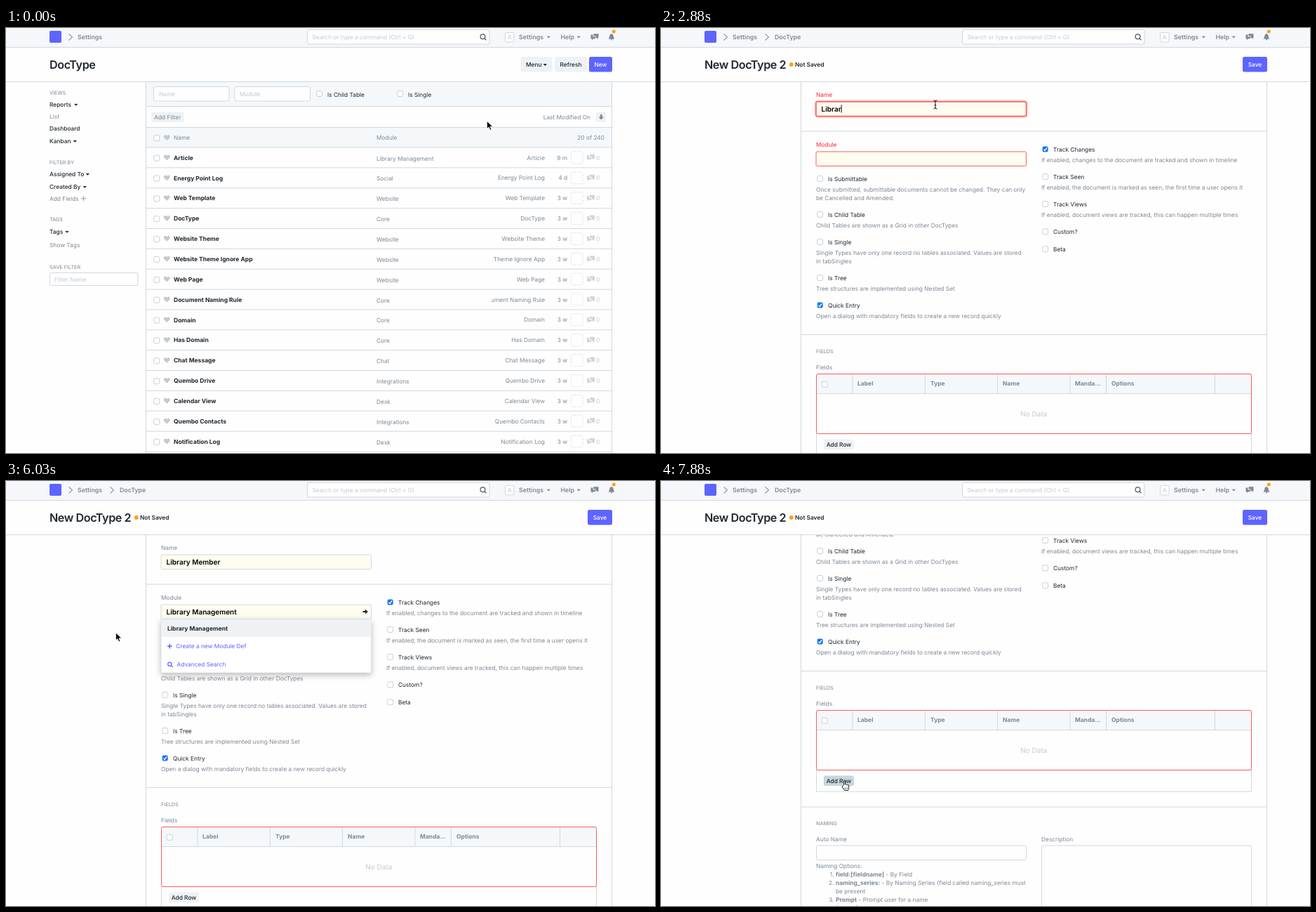
An HTML page for the animation above (8000 ms loop, 925 by 605 pixels).

```html
<!DOCTYPE html>
<html lang="en">
<head>
<meta charset="utf-8">
<title>New DocType</title>
<style>
html, body { margin: 0; width: 100%; height: 100%; overflow: hidden; background: #fefefe; }
svg { display: block; width: 925px; height: 605px; }
text { font: 400 8.35px Inter, sans-serif; fill: #1f272e; white-space: pre; text-rendering: geometricPrecision; }
.grey { fill: #7d8994; }
.pale { fill: #c3cad0; }
.blue { fill: #5e64ff; }
.white { fill: #fff; }
.med { font-weight: 500; }
.semi { font-weight: 600; }
.bold { font-weight: 700; font-size: 8.5px; }
.nav { font-weight: 600; font-size: 8.8px; fill: #7d8994; }
.cap { font-size: 7.3px; fill: #7d8994; }
.title { font-size: 16.2px; font-weight: 600; letter-spacing: -.45px; }
.value { font-size: 10px; font-weight: 600; fill: #000; }
.end { text-anchor: end; }
.mid { text-anchor: middle; }
.line { fill: none; stroke: #d1d8dd; }
.box { fill: #fefefe; stroke: #d1d8dd; }
.tint { fill: #f5f8fb; }
.btn { fill: #eef2f5; }
.field rect { fill: #fffdf0; stroke: #d1d8dd; }
.field .label { fill: #7d8994; }
.need rect { stroke: #f85f5f; }
.need .label { fill: #f8262f; }
.focus rect { filter: drop-shadow(0 0 1.5px #aab4bd); }
.need.focus rect { stroke-width: 1.5; filter: drop-shadow(0 0 1.5px #ff5858); }
.caret { stroke: #000; visibility: hidden; }
.focus .caret { visibility: visible; }
</style>
</head>
<body>
<svg id="stage" viewBox="0 0 925 605"></svg>
<script>
const text = (x, y, s, c = '') => `<text x="${x}" y="${y}" class="${c}">${s}</text>`;
const rect = (x, y, w, h, c, r = 0, more = '') =>
  `<rect x="${x}" y="${y}" width="${w}" height="${h}" rx="${r}" class="${c}" ${more}/>`;
const path = (d, more = 'class="line"') => `<path d="${d}" ${more}/>`;
const group = (id, body, more = '') => `<g id="${id}" ${more}>${body}</g>`;
const down = (x, y, color = '#1f272e') => path(`M${x - 2.7} ${y - 1.3}h5.4l-2.7 2.9z`, `fill="${color}"`);
const chevron = x => path(`M${x} 8.5l5 4.5l-5 4.5`, 'fill="none" stroke="#8d99a6" stroke-width="1.1"');
const lens = (x, y, r, color) => `<g fill="none" stroke="${color}" stroke-width="1.2">
  <circle cx="${x}" cy="${y}" r="${r}"/>${path(`M${x + r * .7} ${y + r * .7}l2.6 2.6`, '')}</g>`;
const button = (x, y, w, h, s, c = 'med', fill = 'btn') =>
  rect(x, y, w, h, fill, 2.5) + text(x + w / 2, y + h / 2 + 3, s, c + ' mid');
const check = (x, y, on) => rect(x - .3, y, 8, 8, '', 2,
  on ? 'fill="#1677f2"' : 'fill="#fff" stroke="#bcc3c9" stroke-width=".8"') +
  (on ? path(`M${x + 1.5} ${y + 4.2}l1.7 1.8l2.9-4.1`, 'fill="none" stroke="#fff" stroke-width="1.3"') : '');
const heart = (x, y) => path(`M${x} ${y + 4.2}l-4-4c-1.6-2.2 1.4-5.8 4-2.6c2.6-3.2 5.6.4 4 2.6z`, 'fill="#c3cad0"');
const chat = (x, y, color) => path(`M${x + 4} ${y}h7v5.8h-1v2l-2-2h-1v-2.6h-3z
  M${x} ${y + 1.2}h3v3h3.4v2.8h-3l-2 2v-2h-1.4z`, `fill="${color}"`);

const sidebar = () => {
  const caps = [['VIEWS', 94.5], ['FILTER BY', 193.5], ['TAGS', 275], ['SAVE FILTER', 343]];
  const items = [['Reports', 112, 99.7], ['List', 129], ['Dashboard', 146], ['Kanban', 164, 98.3],
    ['Assigned To', 211, 116.3], ['Created By', 229, 112.3], ['Add Fields', 246], ['Tags', 293, 87], ['Show Tags', 312]];
  const soft = ['List', 'Add Fields', 'Show Tags'];
  return caps.map(([s, y]) => text(62, y, s, 'cap')).join('') +
    items.map(([s, y, x]) => text(62, y, s, soft.includes(s) ? 'grey' : 'med') + (x ? down(x, y - 2.8) : '')).join('') +
    path('M107 242.8h7m-3.5-3.5v7', 'stroke="#8d99a6"') +
    rect(62.5, 348.5, 125.5, 18, 'box', 2) + text(69, 361, 'Filter Name', 'pale');
};

const listRow = ([name, module, age = '3 w'], i) => {
  const y = 184.5 + i * 28.86;
  return check(211, y - 3.3) + heart(229.3, y - .3) + text(239, y + 3.2, name, 'bold') +
    text(528, y + 4, module, 'grey') +
    `<g clip-path="url(#cut)">${text(768, y + 3, name, 'grey end')}</g>` +
    text(800, y + 3, age, 'grey end') +
    rect(805.5, y - 8.5, 16.5, 17, 'line', 2, 'stroke-dasharray="2 1.5" stroke-width=".8"') +
    chat(828, y - 4.5, '#d0d6db') + text(841, y + 3, '0', 'pale') + path(`M200 ${y + 14.4}h663`);
};

const listPage = () => sidebar() +
  rect(200, 77, 663, 34, 'tint') + rect(200, 141, 663, 29, 'tint') +
  path('M199.5 77V605M863.5 77V605M200 111.5h663M200 141.5h663M200 170h663') +
  rect(210.5, 83.5, 107.5, 20.5, 'box', 2) + text(218, 97, 'Name', 'pale') +
  rect(326, 83.5, 107.5, 20.5, 'box', 2) + text(333, 97, 'Module', 'pale') +
  check(443, 89.5) + text(458, 97.5, 'Is Child Table') + check(558, 89.5) + text(573, 97.5, 'Is Single') +
  button(207, 119.5, 46.5, 14.5, 'Add Filter', 'grey') + text(833, 130, 'Last Modified On', 'grey end') +
  rect(841, 119.5, 14.5, 14.5, 'btn', 2) + path('M847 123h2.6v3.5h2.4l-3.7 4l-3.7-4h2.4z', 'fill="#7d8994"') +
  check(211, 152.7) + heart(229.3, 156) + text(239, 159.3, 'Name', 'grey') +
  text(528, 159.3, 'Module', 'grey') + text(853, 159.3, '20 of 240', 'grey end') +
  [['Article', 'Library Management', '9 m'], ['Energy Point Log', 'Social', '4 d'], ['Web Template', 'Website'],
    ['DocType', 'Core'], ['Website Theme', 'Website'], ['Website Theme Ignore App', 'Website'], ['Web Page', 'Website'],
    ['Document Naming Rule', 'Core'], ['Domain', 'Core'], ['Has Domain', 'Core'], ['Chat Message', 'Chat'],
    ['Quembo Drive', 'Integrations'], ['Calendar View', 'Desk'], ['Quembo Contacts', 'Integrations'],
    ['Notification Log', 'Desk']].map(listRow).join('');

const field = (id, label, y) => group(id,
  text(221, y, label, 'label') + rect(221, y + 7, 299.5, 20.5, '', 2) +
  text(228.5, y + 20.8, '', 'value') + path(`M229 ${y + 11.5}v11`, 'class="caret"'), 'class="field need"');

const option = (x, y, label, lines = [], on) => check(x, y - 7.5, on) + text(x + 15, y, label) +
  lines.map((s, i) => text(x - 2, y + 14.7 + i * 12, s, 'grey')).join('');

const formPage = () =>
  path('M200 147h663M200 436.5h663M200 630h663') +
  field('name', 'Name', 98) + field('module', 'Module', 169) +
  option(223, 218, 'Is Submittable', ['Once submitted, submittable documents cannot be changed. They can only', 'be Cancelled and Amended.']) +
  option(223, 269, 'Is Child Table', ['Child Tables are shown as a Grid in other DocTypes']) +
  option(223, 308, 'Is Single', ['Single Types have only one record no tables associated. Values are stored', 'in tabSingles']) +
  option(223, 359, 'Is Tree', ['Tree structures are implemented using Nested Set']) +
  option(223, 398, 'Quick Entry', ['Open a dialog with mandatory fields to create a new record quickly'], true) +
  option(544, 176, 'Track Changes', ['If enabled, changes to the document are tracked and shown in timeline'], true) +
  option(544, 215, 'Track Seen', ['If enabled, the document is marked as seen, the first time a user opens it']) +
  option(544, 254, 'Track Views', ['If enabled, document views are tracked, this can happen multiple times']) +
  option(544, 293.3, 'Custom?') + option(544, 318.3, 'Beta') +
  text(221, 463, 'FIELDS', 'cap') + text(221, 486, 'Fields', 'grey') +
  rect(221.5, 570, 620, 38, 'line') + rect(221.5, 492.5, 620, 85, 'box', 2) + rect(222, 493, 619, 27.5, 'tint') +
  path('M222 520.5h619' + [273, 376.5, 479.5, 583, 634.5, 789.5].map(x => `M${x} 493v27.5`).join('')) +
  rect(221.5, 492.5, 620, 85, '', 2, 'fill="none" stroke="#f85f5f"') + check(229.5, 503.2) +
  [['Label', 280], ['Type', 384], ['Name', 487], ['Manda...', 590], ['Options', 642]]
    .map(([s, x]) => text(x, 509.2, s, 'grey bold')).join('') +
  `<text x="531.3" y="553" class="pale mid" style="font-size:10px">No Data</text>` +
  group('add', button(232, 585.5, 43, 14.5, 'Add Row')) +
  text(221, 655.5, 'NAMING', 'cap') + text(221, 678.5, 'Auto Name', 'grey') + rect(221.5, 685, 299, 20.5, 'box', 2) +
  text(542, 678.5, 'Description', 'grey') + rect(542.5, 685, 299, 200, 'box', 2) +
  text(221, 717.3, 'Naming Options:', 'grey') +
  [['1.', 'field:[fieldname]', ' - By Field'], ['2.', 'naming_series:', ' - By Naming Series (field called naming_series must'],
    ['', '', 'be present'], ['3.', 'Prompt', ' - Prompt user for a name'],
    ['4.', '[series]', ' - Series by prefix (separated by a dot); for']]
    .map(([n, key, s], i) => text(246.5, 729.4 + i * 12, n, 'grey end') +
      text(249, 729.4 + i * 12, `<tspan class="bold">${key}</tspan>${s}`, 'grey')).join('') +
  group('go', path('M508.5 184.9h3.4v-2.3l4 3.4l-4 3.4v-2.3h-3.4z', 'fill="#1f272e"')) +
  group('menu', rect(221, 196.5, 299.5, 76.5, '', 2,
      'fill="#fff" stroke="#d5dbe0" stroke-width=".6" style="filter:drop-shadow(0 3px 4px #0004)"') +
    rect(221.3, 197, 299, 25, 'btn') + text(230, 213, 'Library Management', 'bold') +
    path('M230 235.2h6.6m-3.3-3.3v6.6', 'stroke="#5e64ff" stroke-width="1.5"') +
    text(242.3, 238.2, 'Create a new Module Def', 'blue') +
    lens(233.3, 260.7, 2.6, '#5e64ff') + text(243.5, 264, 'Advanced Search', 'blue'));

const navbar = () => rect(0, 0, 925, 27, '', 0, 'fill="#f5f7fa"') + path('M0 27.5h925') +
  rect(62, 4, 17, 17, 'blue', 2) + chevron(89.5) + text(102, 16.2, 'Settings', 'nav') +
  rect(429.5, 2.5, 259.5, 20.5, 'box', 2.5) + text(436.5, 16, 'Search or type a command (Ctrl + G)', 'pale') +
  lens(679.5, 12.3, 3.4, '#4a545e') + rect(711.5, 6.5, 12.5, 13.5, 'box', 2) + text(717.8, 16.3, 'A', 'pale mid') +
  text(731, 16, 'Settings', 'nav') + down(773.3, 13, '#7d8994') +
  text(790.5, 16, 'Help', 'nav') + down(816.3, 13, '#7d8994') + chat(833.5, 8.3, '#7d8994') +
  path('M859 15.3c2-1.8 1-6.8 4-6.8s2 5 4 6.8zM862 16h2.4q-1.2 2.4-2.4 0z', 'fill="#7d8994" stroke="#7d8994" stroke-width=".6"') +
  '<circle cx="866.3" cy="5" r="2.5" fill="#ffa00a"/>';

const hand = 'M2.7 5.5V1.3q1-1.6 2 0V5q1-.8 1.7.3q1.2-.7 1.7.5q1.6-.5 1.6 1.4v2q0 3-1.2 4.2H3.8L.6 9Q-.5 7.4 1 7.2z';
stage.innerHTML = '<clipPath id="cut"><path d="M692 77h80v528h-80z"/></clipPath>' +
  group('list', listPage()) +
  group('form', path('M199.5 77V605M863.5 77V605') + group('page', formPage())) +
  rect(0, 28, 925, 48, '', 0, 'fill="#fefefe"') + path('M0 76.5h925') + navbar() +
  group('listHead', text(62, 58, 'DocType', 'title') + button(733.5, 41, 45, 21.5, '') +
    text(741, 55, 'Menu', 'med') + down(768.3, 52.3) + button(782, 41, 46, 21.5, 'Refresh') +
    group('new', button(831, 41, 33, 21.5, 'New', 'white med', 'blue'))) +
  group('formHead', chevron(148.5) + text(162, 16.2, 'DocType', 'nav') + text(62, 58, 'New DocType 2', 'title') +
    '<circle cx="185.8" cy="52" r="2.9" fill="#ffa00a"/>' + text(191, 55, 'Not Saved', 'semi') +
    button(829, 41, 35, 21.5, 'Save', 'white med', 'blue')) +
  group('cursor',
    group('arrow', path('M0 0v11l2.5-2.4l1.9 4.2l1.9-.8l-1.8-4.1h3.7z', 'fill="#000" stroke="#fff" stroke-width=".8"')) +
    group('beam', path('M-2.5-6q2.5 0 2.5 1.5q0-1.5 2.5-1.5M0-5V5M-2.5 6q2.5 0 2.5-1.5q0 1.5 2.5 1.5M-1.3.8h2.6', 'fill="none" stroke="#111"')) +
    group('hand', path(hand, 'fill="#fff" stroke="#000" stroke-width=".9"') + path('M4 9.5v2M5.8 9.5v2M7.5 9.5v2', 'stroke="#000" stroke-width=".6"')));

const $ = id => document.getElementById(id);
const show = (id, on) => $(id).style.display = on ? '' : 'none';

// Count of the n evenly spaced ticks from a to b that have passed.
const ticks = (t, a, b, n) => t < a ? 0 : b > a ? Math.min(n, 1 + Math.floor((t - a) / (b - a) * (n - 1) + .01)) : 1;
const ease = p => p * p * (3 - 2 * p);

// first tick, last tick, tick count, x, y
const moves = [[120, 120, 1, 760, 94], [270, 510, 3, 845, 49], [1250, 1720, 5, 391, 109],
  [5500, 6030, 6, 156.5, 216], [6370, 6600, 3, 193, 339], [7410, 7880, 5, 258, 427]];
const typing = [[2080, 2080, 1], [2320, 2400, 2], [2640, 3110, 5], [3280, 3730, 5], [3930, 3930, 1]];
const scrolls = [[6600, 20], [6700, 65], [6820, 113], [6940, 146], [7180, 164], [7290, 166]];

function pointer(t) {
  let x = 685.5, y = 132.5;
  for (const [a, b, n, tx, ty] of moves) {
    const p = ease(ticks(t, a, b, n) / n);
    x += (tx - x) * p;
    y += (ty - y) * p;
  }
  return [x, y];
}

function setField(id, value, focus) {
  const box = $(id), input = box.querySelector('.value');
  box.classList.toggle('focus', focus);
  input.textContent = value;
  box.querySelector('.caret').setAttribute('transform', `translate(${input.getComputedTextLength()})`);
}

function draw(t) {
  const isForm = t >= 860, picked = t >= 5390, open = t >= 4820 && t < 6260;
  show('list', !isForm); show('listHead', !isForm);
  show('form', isForm); show('formHead', isForm);
  show('menu', open); show('go', picked && open);
  $('new').querySelector('rect').style.fill = t >= 510 ? '#4348e8' : '';
  $('add').querySelector('rect').style.fill = t >= 7760 ? '#c8d6de' : '';

  const typed = typing.reduce((sum, s) => sum + ticks(t, ...s), 0);
  setField('name', 'Library Member'.slice(0, typed), t >= 1720 && t < 4260);
  setField('module', picked ? 'Library Management' : 'lib'.slice(0, ticks(t, 4710, 4910, 3)), t >= 4350 && !picked);
  $('name').classList.toggle('need', t < 4260);
  $('module').classList.toggle('need', !picked);

  const scroll = scrolls.reduce((y, s) => t >= s[0] ? s[1] : y, 0);
  $('page').setAttribute('transform', `translate(0 ${-scroll})`);
  $('cursor').setAttribute('transform', `translate(${pointer(t)})`);
  const shape = t >= 7760 || t >= 510 && t < 1250 ? 'hand' : t >= 1720 && t < 5500 ? 'beam' : 'arrow';
  for (const s of ['arrow', 'beam', 'hand']) show(s, s === shape);
}

const start = performance.now();
(function loop() {
  draw((performance.now() - start) % 8000);
  requestAnimationFrame(loop);
})();
</script>
</body>
</html>
```
